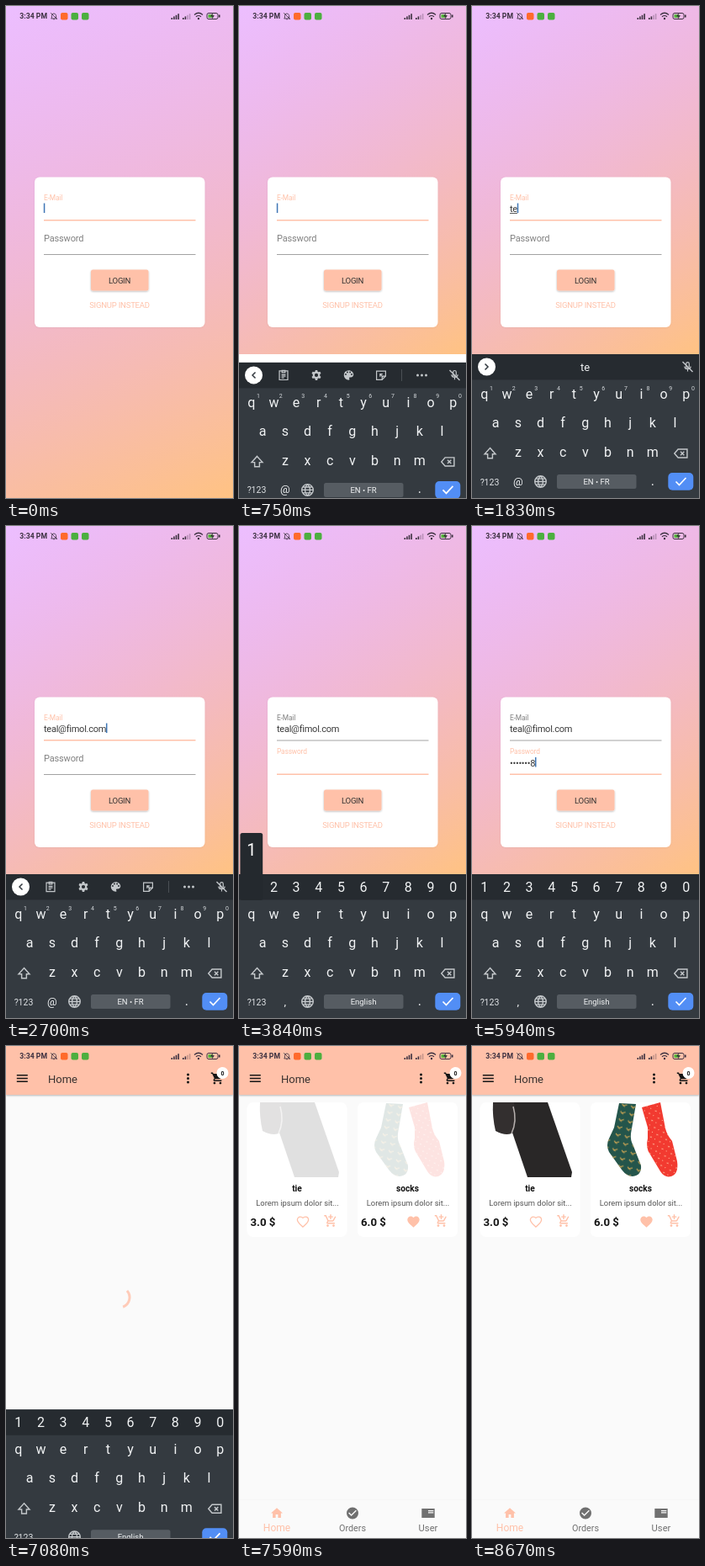
An HTML page for the animation above (8700 ms loop, 270 by 585 pixels).

```html
<!DOCTYPE html>
<html lang="en">
<head>
<meta charset="utf-8">
<title>Shop login</title>
<style>
  html, body { margin: 0; width: 100%; height: 100%; overflow: hidden; background: #fff; }
  svg { display: block; width: 100vw; height: 100vh; }
  text { font-family: Roboto, "Noto Sans", sans-serif; white-space: pre; }
  .mid { text-anchor: middle; }
  .field { font-size: 11px; letter-spacing: -.25px; fill: #3a3a3a; }
  .label { font-size: 8.4px; letter-spacing: -.15px; }
  .key { font-size: 16px; fill: #f1f3f4; text-anchor: middle; }
  .line { fill: none; stroke: #c3c7ca; stroke-width: 2; }
</style>
</head>
<body>
<svg id="stage" viewBox="0 0 270 585" preserveAspectRatio="none"></svg>
<script>
const LOOP = 8700, PEACH = '#ffc1a9', GREY = '#808080', INK = '#3c3140';
const EMAIL = 'teal@fimol.com', PIN = '12345678';

// [time, text in the e-mail field]
const MAIL_STEPS = [[0, ''], [1620, 't'], [1770, 'te'], [1920, 'tea'], [2100, 'teal'], [2520, EMAIL]];
// [key, pressed at, released at]
const PRESSES = [
  ['t', 1620, 1680], ['e', 1740, 1800], ['a', 1920, 1980], ['l', 2070, 2130],
  ['1', 3840, 3915], ['2', 4080, 4200], ['3', 4440, 4530], ['4', 4770, 4890],
  ['5', 5070, 5190], ['6', 5370, 5430], ['7', 5670, 5730], ['8', 5880, 5940]
];
const SLIDE_IN = 420, SIGN_IN = 6390, HOME = 6870, SLIDE_OUT = 6994, GRID = 7500;

const ICONS = {
  cart: 'M7 18c-1.1 0-2 .9-2 2s.9 2 2 2 2-.9 2-2-.9-2-2-2zM1 2v2h2l3.6 7.6-1.35 2.45C4.5 15.4 5.5 17 7 17h12v-2H7.4c-.2 0-.3-.2-.2-.4l.9-1.6h7.45c.75 0 1.4-.4 1.75-1l3.6-6.5C21.3 4.8 20.8 4 20 4H5.2l-.95-2zm16 16c-1.1 0-2 .9-2 2s.9 2 2 2 2-.9 2-2-.9-2-2-2z',
  addCart: 'M11 9h2V6h3V4h-3V1h-2v3H8v2h3zM7 18c-1.1 0-2 .9-2 2s.9 2 2 2 2-.9 2-2-.9-2-2-2zm10 0c-1.1 0-2 .9-2 2s.9 2 2 2 2-.9 2-2-.9-2-2-2zM7.2 14.6l.9-1.6h7.45c.75 0 1.4-.4 1.75-1l3.86-7L19.4 4l-3.86 7H8.5L4.27 2H1v2h2l3.6 7.6-1.35 2.45C4.5 15.4 5.5 17 7 17h12v-2H7.4c-.2 0-.3-.2-.2-.4z',
  heart: 'M12 21.3l-1.45-1.3C5.4 15.3 2 12.3 2 8.5 2 5.4 4.4 3 7.5 3c1.74 0 3.4.8 4.5 2.1C13.1 3.8 14.76 3 16.5 3 19.6 3 22 5.4 22 8.5c0 3.8-3.4 6.86-8.55 11.5z',
  home: 'M10 20v-6h4v6h5v-8h3L12 3 2 12h3v8z',
  check: 'M12 2a10 10 0 1 0 0 20 10 10 0 0 0 0-20zm-2 15l-5-5 1.4-1.4L10 14.2l7.6-7.6L19 8z',
  reader: 'M1 4h22v16H1zm11 3v1.7h9V7zm0 3.2v1.7h9v-1.7z',
  palette: 'M12 3a9 9 0 0 0 0 18c1.4 0 2-1.5 1.1-2.5-.9-1-.2-2.5 1.1-2.5H16c2.76 0 5-2.24 5-5 0-4.4-4-8-9-8zM6.5 12a1.5 1.5 0 1 1 0-3 1.5 1.5 0 0 1 0 3zm3-4a1.5 1.5 0 1 1 0-3 1.5 1.5 0 0 1 0 3zm5 0a1.5 1.5 0 1 1 0-3 1.5 1.5 0 0 1 0 3zm3 4a1.5 1.5 0 1 1 0-3 1.5 1.5 0 0 1 0 3z',
  gear: 'M10 2h4l.6 3 1.7 1 2.9-1 2 3.5L19 10.6v2.8l2.2 2.1-2 3.5-2.9-1-1.7 1-.6 3h-4l-.6-3-1.7-1-2.9 1-2-3.5L5 13.4v-2.8L2.8 8.5l2-3.5 2.9 1 1.7-1zM12 8.5a3.5 3.5 0 1 0 0 7 3.5 3.5 0 0 0 0-7z',
  mic: 'M9 6a3 3 0 0 1 6 0v5a3 3 0 0 1-6 0zM6 11c0 7 12 7 12 0M12 17v4',
  clip: 'M4 4h16v17H4zM9 3h6v4H9zM8 11h8M8 14h8M8 17h5',
  sticker: 'M3 4h18v10h-7v7H3zM14 21l7-7M10 10l6 6M10 15v-5h5',
  shift: 'M12 3l9 10h-5v7H8v-7H3z',
  back: 'M8 5h15v14H8L2 12zM12 9l6 6M18 9l-6 6',
  globe: 'M12 2a10 10 0 1 0 0 20 10 10 0 0 0 0-20zM2 12h20M4 7h16M4 17h16M12 2c-6 6-6 14 0 20 6-6 6-14 0-20',
  bell: 'M6 17V11c0-8 12-8 12 0v6l2 2H4zM10 21h4M3 3l18 18'
};

const place = (name, x, y, s, attrs) =>
  `<path d="${ICONS[name]}" transform="translate(${x - 12 * s} ${y - 12 * s}) scale(${s})" ${attrs}/>`;
const solid = (name, x, y, s, fill) => place(name, x, y, s, `fill="${fill}" fill-rule="evenodd"`);
const outline = (name, x, y, s) => place(name, x, y, s, 'class="line"');
const text = (str, x, y, size, fill, extra = '') =>
  `<text x="${x}" y="${y}" font-size="${size}" fill="${fill}" ${extra}>${str}</text>`;
const mid = (str, x, y, size, fill, extra = '') => text(str, x, y, size, fill, `class="mid" ${extra}`);
const rect = (x, y, w, h, fill, extra = '') =>
  `<rect x="${x}" y="${y}" width="${w}" height="${h}" fill="${fill}" ${extra}/>`;
const circle = (x, y, r, fill) => `<circle cx="${x}" cy="${y}" r="${r}" fill="${fill}"/>`;

// Keyboard rows: characters, first x, text baseline
const STEP = 26.65;
const ROWS = [['1234567890', 14.8, 435], ['qwertyuiop', 14.8, 467], ['asdfghjkl', 28.2, 501], ['zxcvbnm', 54.9, 536]];
const keyAt = {};
const rowKeys = ([chars, x0, y]) => [...chars].map((c, i) => {
  keyAt[c] = { x: x0 + i * STEP, y };
  return `<text class="key" x="${x0 + i * STEP}" y="${y}">${c}</text>`;
}).join('');

function statusBar() {
  const bars = (x, full) => [0, 1, 2, 3].map(i =>
    rect(x + i * 2.6, 14 - i * 1.6, 1.6, 2 + i * 1.6, INK, i < full ? '' : 'opacity=".3"')).join('');
  return text('3:34 PM', 16.3, 15, 8.7, INK, 'font-weight="700"') +
    place('bell', 57, 12, .42, `fill="none" stroke="${INK}" stroke-width="2"`) +
    rect(65, 8, 8.5, 8.5, '#ff6a2b', 'rx="2"') + rect(77.5, 8, 8.5, 8.5, '#4caf3f', 'rx="2"') +
    rect(90, 8, 8.5, 8.5, '#4caf3f', 'rx="2"') + bars(196.5, 4) + bars(210, 2) +
    `<g fill="none" stroke="${INK}" stroke-width="1.2"><path d="M224 10.5q5-4.500 10 0M226 12.8q3-2.6 6 0"/>
     <rect x="239" y="8.5" width="13" height="7" rx="2" stroke-width="1"/></g>` +
    circle(229, 15, 1.2, INK) + rect(240.5, 10, 6, 4, '#55b83c') + rect(253, 10.5, 1.6, 3, INK) +
    `<path d="M246 8l-3 4.5h2.5l-1 3.5 3.5-4.8h-2.6z" fill="${INK}"/>`;
}

function loginPage() {
  return rect(0, 0, 270, 585, '#fff') +
    '<rect id="sky" width="270" height="585" fill="url(#dusk)"/>' +
    rect(34, 203.5, 202.5, 178.5, '#fff', 'rx="6" filter="url(#soft)"') +
    `<text id="mailLabel" class="label" x="45" y="231">E-Mail</text>
     <text id="mail" class="field" x="45" y="244.5"></text>
     <rect id="mailMark" x="45" y="246" height=".8" fill="#333"/>
     <rect id="mailLine" x="45" width="180.5"/>
     <text id="pinLabel" class="label" x="45">Password</text>
     <text id="pin" class="field" x="45" y="285.5"></text>
     <rect id="pinLine" x="45" width="180.5"/>
     <rect id="caret" width="1.5" height="11.5" fill="#3f76b5"/>
     <g id="button">` + rect(101, 313.5, 68.5, 25, PEACH, 'rx="2.5" filter="url(#drop)"') +
    '<circle id="ripple" cx="135" cy="326" fill="#fff" opacity=".3" clip-path="url(#buttonClip)"/>' +
    mid('LOGIN', 135, 329.7, 9.6, '#333', 'letter-spacing="-.3"') + '</g>' +
    mid('SIGNUP INSTEAD', 135, 358.5, 9.5, PEACH, 'letter-spacing="-.2"');
}

function product(x, name, price, liked) {
  const heart = liked ? solid('heart', x + 66.5, 209, .72, PEACH)
    : place('heart', x + 66.5, 209, .66, `fill="none" stroke="${PEACH}" stroke-width="2"`);
  return rect(x, 67, 119, 160, '#fff', 'rx="7"') +
    mid(name, x + 59.5, 172.5, 10.2, '#111', 'font-weight="700"') +
    mid('Lorem ipsum dolor sit...', x + 60, 190, 9.4, '#555') +
    text(price, x + 4, 213.5, 13.2, '#151515', 'font-weight="700"') +
    heart + solid('addCart', x + 99.5, 208, .7, PEACH);
}

function photos() {
  const green = 'M175 68L195 69 189 104Q188 112 192 119L201 142Q202 154 191 155 184 155 178 147L163 126Q159 118 163 110L169 97Z';
  const red = 'M202 73L224 67 230 98Q232 106 238 113L244 137Q246 152 237 155 229 157 224 149L212 129Q206 121 209 110L209 97Z';
  return `<path d="M47 67H90L119 150 118 156H66L48 103Z" fill="#292727"/>
    <path d="M25 67H50Q54 88 47 104 39 107 28 101 24 84 25 67Z" fill="#332f2f"/>
    <path d="M49 72Q54 89 47 104" fill="none" stroke="#b5afad" stroke-width="1.5"/>
    <path d="${green}" fill="#24554b"/><path d="${green}" fill="url(#gold)"/>
    <path d="${red}" fill="#f23a30"/><path d="${red}" fill="url(#flecks)"/>`;
}

function homePage() {
  const tab = (icon, label, x, size, fill) => solid(icon, x, 555.5, .7, fill) + mid(label, x, 576.5, size, fill);
  return rect(0, 0, 270, 585, '#fafafa') +
    rect(0, 0, 270, 58, PEACH, 'filter="url(#drop)"') +
    [34, 37.75, 41.5].map(y => rect(12.8, y, 13, 1.5, '#151515')).join('') +
    text('Home', 50, 43.7, 13, '#3a3230') +
    [34, 38.5, 43].map(y => circle(216.5, y, 1.5, '#151515')).join('') +
    solid('cart', 251.5, 38.5, .7, '#151515') + circle(257.5, 32, 7, '#fff') +
    mid('0', 257.5, 34.5, 7, '#111', 'font-weight="700"') +
    '<g id="grid">' + product(9.5, 'tie', '3.0 $', false) + product(141, 'socks', '6.0 $', true) +
    `<g id="photos">${photos()}</g></g>` +
    rect(0, 540, 270, 45, '#fafafa', 'filter="url(#soft)"') +
    tab('home', 'Home', 45, 12, PEACH) + tab('check', 'Orders', 135, 10.8, '#707070') +
    tab('reader', 'User', 225, 11.2, '#707070');
}

function keyboard() {
  const chip = dir => circle(17.5, 429, 10.5, '#fff') +
    `<path d="M${17.5 - 2 * dir} 425.5l${3.5 * dir} 3.5l${-3.5 * dir} 3.5" fill="none" stroke="#333a40" stroke-width="1.5"/>`;
  const tint = '#c3c7ca';
  const hints = [...'1234567890'].map((c, i) => mid(c, 23 + i * STEP, 456.5, 7, '#d3d7da')).join('');
  return rect(0, 414, 270, 171, '#343a40') + rect(0, 414, 270, 30.5, '#262b30') +
    `<g id="tools">${chip(-1)}${outline('clip', 53, 429, .62)}${solid('gear', 92, 429, .6, tint)}
      ${solid('palette', 130.5, 429, .64, tint)}${outline('sticker', 169, 429, .6)}
      ${rect(193, 422, .8, 14, '#555b60')}${[212.5, 217.5, 222.5].map(x => circle(x, 429, 1.5, tint)).join('')}</g>
     <g id="hintBar">${chip(1)}<text id="hint" class="mid" x="134.5" y="433.5" font-size="13" fill="#f1f3f4"></text></g>
     <g id="micOff">${outline('mic', 256.5, 429, .6)}<path d="M250.5 423l12 12" stroke="${tint}" stroke-width="1.4"/></g>
     <g id="numbers">${rowKeys(ROWS[0])}</g>` + ROWS.slice(1).map(rowKeys).join('') +
    `<g id="hints">${hints}</g>` + outline('shift', 21.5, 532, .72) + outline('back', 248, 532, .72) +
    mid('?123', 21, 569.5, 10.5, '#dfe2e4') + '<text id="extra" class="key" x="54.9" y="569.5" style="font-size:13px"></text>' +
    outline('globe', 81.5, 565.5, .68) + rect(101, 557, 94.5, 17, '#565c62', 'rx="2.5"') +
    '<text id="space" class="mid" x="148" y="569" font-size="9.5" fill="#f1f3f4"></text>' +
    mid('.', 214.8, 569.5, 16, '#f1f3f4') + rect(233.3, 555, 30, 20.7, '#528ef5', 'rx="5"') +
    '<path d="M242.5 565.5l4 4 8-8.5" fill="none" stroke="#fff" stroke-width="1.7"/>' +
    `<g id="popup">${rect(-13.4, -70, 26.8, 80, '#24292e', 'rx="2.5"')}${mid('', 0, -43, 20, '#fff', 'id="popupKey"')}</g>`;
}

const stage = document.getElementById('stage');
stage.innerHTML = `<defs>
  <linearGradient id="dusk" gradientUnits="userSpaceOnUse" x1="0" y1="0" x2="270" y2="585">
    <stop stop-color="rgb(215,117,255)" stop-opacity=".47"/>
    <stop offset="1" stop-color="rgb(255,188,117)" stop-opacity=".9"/></linearGradient>
  <filter id="soft" x="-10%" y="-10%" width="120%" height="125%"><feDropShadow dx="0" dy=".5" stdDeviation="1" flood-opacity=".06"/></filter>
  <filter id="drop" x="-10%" y="-10%" width="120%" height="140%"><feDropShadow dx="0" dy="1" stdDeviation=".9" flood-opacity=".28"/></filter>
  <clipPath id="buttonClip"><rect x="101" y="313.5" width="68.5" height="25" rx="2.5"/></clipPath>
  <pattern id="gold" width="11" height="9" patternUnits="userSpaceOnUse" patternTransform="rotate(12)">
    <path d="M2 3l2 2 4-2M4 5l2 1" fill="none" stroke="#c7a252" stroke-width="1.2"/></pattern>
  <pattern id="flecks" width="8" height="9" patternUnits="userSpaceOnUse" patternTransform="rotate(-20)">
    <path d="M2 3l2 1M6 7l1 1" stroke="#ffc0a0" stroke-width="1"/></pattern>
</defs>
<g id="login">${loginPage()}</g><g id="home">${homePage()}</g>
<path id="spinner" fill="none" stroke="#ffcbb8" stroke-width="3"/>
${statusBar()}<g id="keyboard">${keyboard()}</g>`;

const ui = {};
stage.querySelectorAll('[id]').forEach(el => ui[el.id] = el);
const show = (id, on) => ui[id].setAttribute('display', on ? 'inline' : 'none');
const set = (id, attrs) => { for (const k in attrs) ui[id].setAttribute(k, attrs[k]); };
const write = (id, str) => { if (ui[id].textContent !== str) ui[id].textContent = str; };
const part = (t, from, length) => Math.min(1, Math.max(0, (t - from) / length));
const mix = (a, b, p) => a + (b - a) * p;

// cubic-bezier(.4, 0, .2, 1)
function ease(x) {
  let lo = 0, hi = 1;
  for (let i = 0; i < 18; i++) {
    const s = (lo + hi) / 2, r = 1 - s;
    if (1.2 * r * r * s + .6 * r * s * s + s ** 3 < x) lo = s; else hi = s;
  }
  return lo * lo * (3 - 2 * lo);
}

function drawSpinner(ms, x, y) {
  const cycle = ms / 1333 % 1;
  const head = ease(Math.min(1, cycle * 2)), tail = ease(Math.max(0, cycle * 2 - 1));
  const from = Math.PI * (-.5 + 1.5 * tail + 2 * ms / 2222 + .5 * cycle);
  const sweep = Math.max(.02, Math.PI * 1.5 * (head - tail));
  const point = a => `${x + 12 * Math.cos(a)} ${y + 12 * Math.sin(a)}`;
  set('spinner', { d: `M${point(from)}A12 12 0 ${sweep > Math.PI ? 1 : 0} 1 ${point(from + sweep)}` });
}

function drawForm(t) {
  const mail = MAIL_STEPS.filter(s => s[0] <= t).pop()[1];
  const onPin = t >= 3000, lift = ease(part(t, 3000, 167));
  const typed = PRESSES.filter(p => PIN.includes(p[0]) && p[2] <= t).length;
  const height = t < SLIDE_IN ? 585 : 414;
  set('sky', { height });
  set('dusk', { y2: height });
  write('mail', mail);
  write('pin', typed ? '•'.repeat(typed - 1) + PIN[typed - 1] : '');
  set('mailLabel', { fill: onPin ? GREY : PEACH });
  set('mailLine', onPin ? { y: 254.6, height: .8, fill: '#8c8c8c' } : { y: 254, height: 1.5, fill: PEACH });
  set('pinLine', onPin ? { y: 294.5, height: 1.5, fill: PEACH } : { y: 295, height: .8, fill: '#8c8c8c' });
  set('pinLabel', { y: mix(279.7, 271.3, lift), fill: onPin ? PEACH : GREY });
  ui.pinLabel.style.fontSize = mix(11, 8.4, lift) + 'px';
  const width = ui[onPin ? 'pin' : 'mail'].getComputedTextLength();
  set('caret', { x: 44.8 + width, y: onPin ? 275 : 234.5 });
  show('caret', t < 1020 || t >= 1470 && t < 3600 || t >= 3900);
  set('mailMark', { width: onPin ? 0 : width });
  show('mailMark', t >= 1620 && t < 2520);
  show('button', t < SIGN_IN + 120);
  set('ripple', { r: 40 * part(t, SIGN_IN, 120) });
}

function drawKeyboard(t) {
  const drop = t < 3000 ? (1 - part(t, SLIDE_IN, 436)) ** 2 : part(t, SLIDE_OUT, 266) ** 2;
  set('keyboard', { transform: `translate(0 ${171 * drop})` });
  show('keyboard', drop < 1);
  const numeric = t >= 3210, hinting = t >= 1620 && t < 2640;
  show('numbers', numeric);
  show('hints', !numeric);
  show('micOff', !numeric);
  show('tools', !numeric && !hinting);
  show('hintBar', hinting);
  write('hint', t >= 2100 ? EMAIL : t >= 1920 ? 'tea' : t >= 1770 ? 'te' : 't');
  write('extra', numeric ? ',' : '@');
  write('space', numeric ? 'English' : 'EN • FR');
  const press = PRESSES.find(p => p[1] <= t && t < p[2]);
  show('popup', press);
  if (press) {
    const { x, y } = keyAt[press[0]];
    set('popup', { transform: `translate(${x} ${y})` });
    write('popupKey', press[0]);
  }
}

function render(t) {
  const atHome = t >= HOME;
  show('login', !atHome);
  show('home', atHome);
  show('grid', t >= GRID);
  set('photos', { opacity: part(t, GRID, 660) });
  show('spinner', t >= SIGN_IN + 120 && t < GRID);
  if (atHome) drawSpinner(t - HOME, 135, 299);
  else { drawForm(t); drawSpinner(Math.max(0, t - SIGN_IN - 120), 135, 326); }
  drawKeyboard(t);
}

const begin = performance.now();
function tick() {
  render((performance.now() - begin) % LOOP);
  requestAnimationFrame(tick);
}
tick();
</script>
</body>
</html>
```
